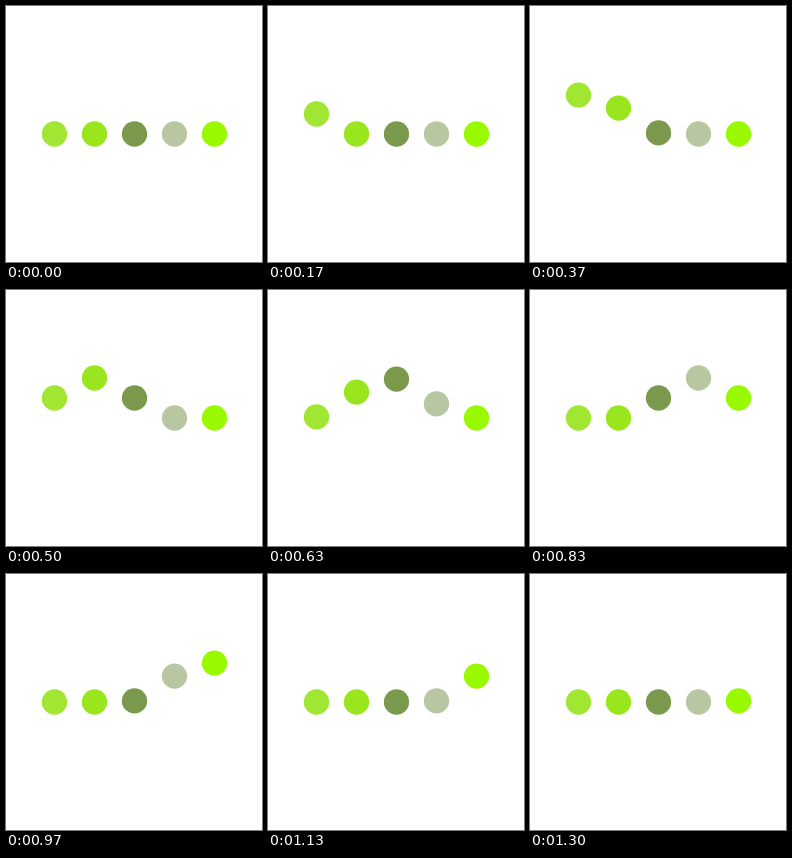
An HTML page for the animation above (1.33 s loop, 256 by 256 pixels).

```html
<!DOCTYPE html>
<html lang="en">
<head>
<meta charset="utf-8">
<title>Loading dots</title>
<style>
  html, body { margin: 0; width: 100%; height: 100%; overflow: hidden; background: #fff; }
  svg { display: block; width: 100vw; height: 100vh; }
</style>
</head>
<body>
<svg id="stage" viewBox="0 0 256 256"></svg>
<script>
  const LOOP = 1330;
  const COLORS = ['#a0e632', '#99e61f', '#7b994d', '#b8c7a1', '#99fa00'];
  const BASE_Y = 128, LIFT = 40, GAP = 40, RADIUS = 12.65;
  const HALF = 10, STAGGER = 5; // in steps of 1/30 s

  const stage = document.getElementById('stage');
  const dots = COLORS.map((color, i) => {
    const dot = document.createElementNS('http://www.w3.org/2000/svg', 'circle');
    dot.setAttribute('cx', 48.5 + GAP * i);
    dot.setAttribute('r', RADIUS);
    dot.setAttribute('fill', color);
    return stage.appendChild(dot);
  });

  const ease = t => t * t * (3 - 2 * t);

  // Step boundaries fall on whole hundredths of a second.
  const stepAt = ms => {
    let step = Math.floor(ms * 0.03) + 1;
    while (Math.round(step * 10 / 3) * 10 > ms) step--;
    return step;
  };

  function draw(ms) {
    const step = stepAt(ms % LOOP);
    dots.forEach((dot, i) => {
      const phase = step - STAGGER * i;
      const rise = Math.max(0, 1 - Math.abs(phase - HALF) / HALF);
      dot.setAttribute('cy', BASE_Y - LIFT * ease(rise));
    });
  }

  const start = performance.now();
  function tick() {
    draw(performance.now() - start);
    requestAnimationFrame(tick);
  }
  tick();
</script>
</body>
</html>
```
